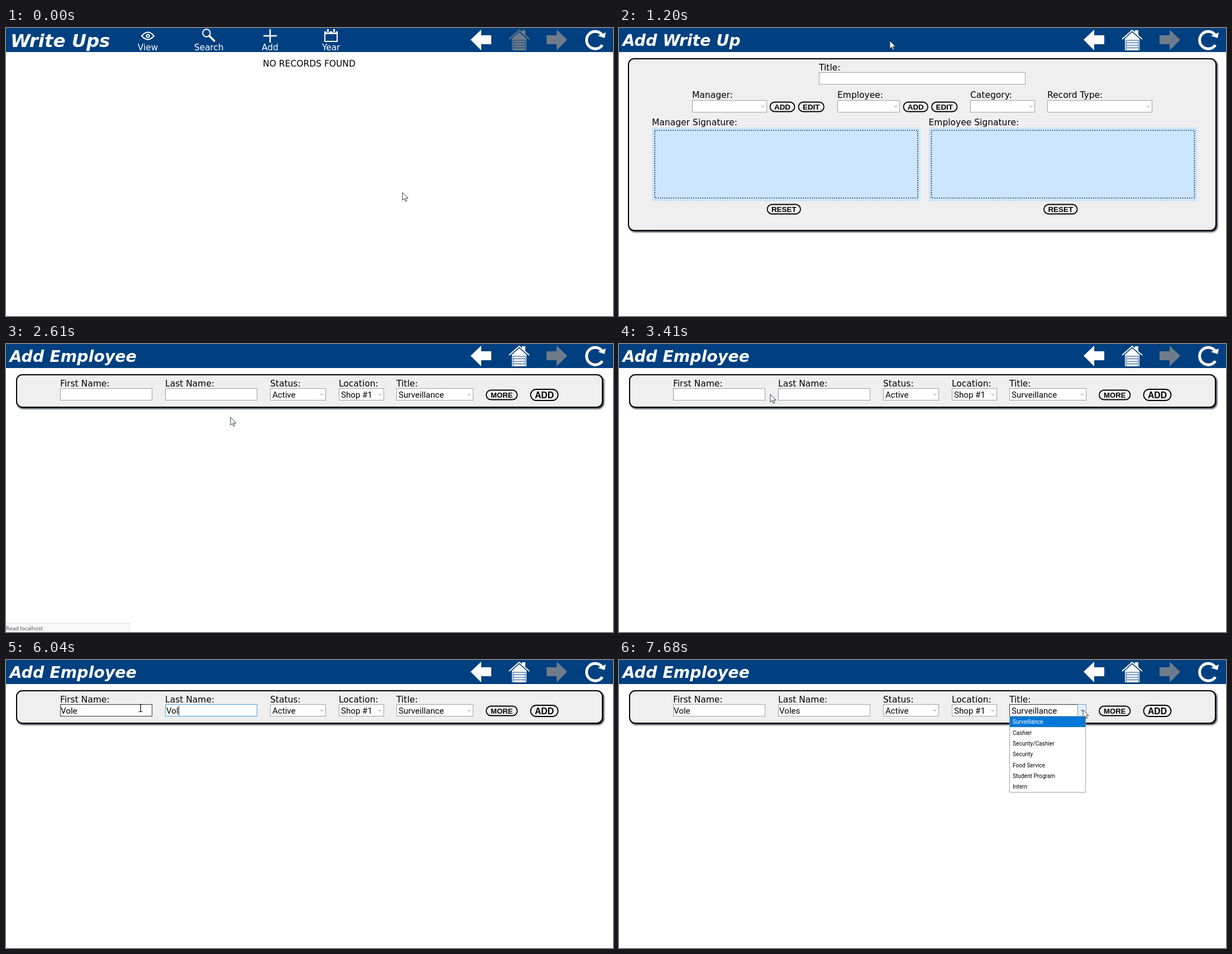
Recreate the animation shown at these times as an HTML page. Size 1087 px wide and 515 px high, loop 8 s.

```html
<!DOCTYPE html>
<html lang="en">
<head>
<meta charset="utf-8">
<title>Write Ups</title>
<style>
  html, body { margin: 0; width: 100%; height: 100%; overflow: hidden; background: #fff; }
  svg { display: block; width: 1087px; height: 515px; }
  text { white-space: pre; }
  .label { font: 15.5px "DejaVu Sans", sans-serif; }
  .tool { font: 15.3px "DejaVu Sans", sans-serif; fill: #fff; text-anchor: middle; }
  .heading { font: italic bold 28.4px "DejaVu Sans", sans-serif; fill: #fff; }
  .value { font: 15.1px Roboto, "Open Sans", sans-serif; }
  .option { font: 10.15px Roboto, "Open Sans", sans-serif; }
  .status { font: 9.7px "Open Sans", "Noto Sans", sans-serif; fill: #444; }
  .button { font-family: "Liberation Sans", Arial, sans-serif; font-weight: bold; text-anchor: middle; }
  .panel { fill: #efefef; stroke: #000; stroke-width: 2; filter: drop-shadow(2.5px 2.5px 1.8px #1c2733); }
  .field { fill: #fff; stroke: #a0a0a0; }
  .line { fill: none; stroke: #fff; }
</style>
</head>
<body>
<svg id="stage" viewBox="0 0 1087 515"></svg>
<script>
const LOOP = 8000, BLUE = '#004080', GREY = '#6e7c8a';
const FIRST = 'Vole', LAST = 'Voles';

const label = (x, y, s) => `<text class="label" x="${x}" y="${y}">${s}</text>`;
const heading = (x, y, s, size = 28.4) =>
  `<text class="heading" x="${x}" y="${y}" style="font-size:${size}px">${s}</text>`;
const panel = (x, y, w, h) => `<rect class="panel" x="${x}" y="${y}" width="${w}" height="${h}" rx="10"/>`;

function field(x, y, right, id = '') {
  return `<rect class="field" id="${id}" x="${x + .5}" y="${y + .5}" width="${right - x - 1}" height="21"/>`;
}
function select(x, y, right, value = '') {
  return field(x, y, right) +
    `<path d="M${right - 10} ${y + 10}l2.5 2.5l2.5 -2.5" fill="none" stroke="#777"/>` +
    `<text class="value" x="${x + 4}" y="${y + 17}">${value}</text>`;
}
function button(x, y, right, s, { h = 19, size = 13.4, id = '' } = {}) {
  return `<g id="${id}" stroke="#000" fill="#000">
    <rect x="${x + 1}" y="${y + 1}" width="${right - x - 2}" height="${h - 2}" rx="${h / 2 - 1}" fill="#f2f2f2" stroke-width="1.8"/>
    <text class="button" x="${(x + right) / 2}" y="${y + h / 2 + size * .36}" font-size="${size}" stroke="none">${s}</text></g>`;
}
function signature(x, who) {
  return label(x, 174, who + ' Signature:') +
    `<rect x="${x}" y="178" width="481" height="132" fill="#cce6ff"/>
     <rect x="${x + 5}" y="183" width="471" height="121" fill="none" stroke="#1a222a" stroke-width="1.7" stroke-dasharray="1.7 2.3"/>` +
    button(x + 205.5, 314.5, x + 267, 'RESET');
}

const arrowLeft = 'M832 21L851 3V13H869V29H851V40Z';
const navigation = `
  <path d="${arrowLeft}" fill="#fff"/>
  <path d="${arrowLeft}" fill="${GREY}" transform="matrix(-1 0 0 1 1837 0)"/>
  <g id="home">
    <path d="M924 4H930V14L924 9ZM906 19L919 7L932 19V40H906Z"/>
    <path d="M901 20L919 4L937 20" fill="none" stroke="currentColor" stroke-width="2"/>
    <path d="M904 20L919 7L934 20M908 40V22H930V40M909 26.5H929M909 31H929M909 35.5H929" fill="none" stroke="${BLUE}"/>
  </g>
  <path class="line" d="M1066.9 11.5A15.5 15.5 0 1 0 1068 30.4" stroke-width="5"/>
  <path d="M1074 8L1072 18L1060 14Z" fill="#fff"/>`;

const listPage = `
  ${heading(8, 34, 'Write Ups', 32.4)}
  <g class="line" stroke-width="2">
    <path d="M243 14Q254 1 265 14Q254 27 243 14Z"/><circle cx="254" cy="14" r="2.6"/>
    <circle cx="359" cy="9" r="6.7"/><path d="M364 14L374 24" stroke-width="3.6"/>
    <path d="M461 14H485M473 2V26" stroke-width="2.5"/>
    <path d="M571 7H593V24H571Z"/><path d="M570 8.5H594" stroke-width="5"/>
    <path d="M576.5 1V8M587.5 1V8" stroke="${BLUE}" stroke-width="6"/>
    <path d="M576.5 2V7M587.5 2V7" stroke-width="3"/>
  </g>
  ${['View', 'Search', 'Add', 'Year'].map((s, i) =>
    `<text class="tool" x="${254 + 109.4 * i}" y="40">${s}</text>`).join('')}
  <text class="label" x="543" y="69" text-anchor="middle">NO RECORDS FOUND</text>`;

const writeUpPage = heading(6.5, 32, 'Add Write Up') + panel(17, 55, 1052, 307) +
  label(358, 76, 'Title:') + field(358, 79, 728) +
  label(131, 125, 'Manager:') + select(131, 129, 265) +
  button(269.5, 131.5, 315.5, 'ADD') + button(320.5, 131.5, 368, 'EDIT') +
  label(391, 125, 'Employee:') + select(391, 129, 503) +
  button(508.5, 131.5, 554, 'ADD', { id: 'addEmployee' }) + button(559, 131.5, 606.5, 'EDIT') +
  label(629, 125, 'Category:') + select(629, 129, 745) +
  label(767, 125, 'Record Type:') + select(767, 129, 955) +
  signature(59, 'Manager') + signature(554.5, 'Employee');

const jobs = ['Surveillance', 'Cashier', 'Security/Cashier', 'Security', 'Food Service', 'Student Program', 'Intern'];
const dropdown = `
  <rect x="699.5" y="79.5" width="137" height="21" fill="none" stroke="#333"/>
  <rect x="821.5" y="79.5" width="15" height="21" fill="#e5f1fb" stroke="#5fa8dc"/>
  <path d="M827 89l2.5 2.5l2.5 -2.5" fill="none" stroke="#333"/>
  <rect x="699.5" y="100.5" width="136" height="136" fill="#fff" stroke="#a0a0a0"/>
  <rect x="700" y="101" width="135" height="19" fill="#0078d7"/>
  ${jobs.map((s, i) => `<text class="option" x="705" y="${114.3 + 19.3 * i}" fill="${i ? '#000' : '#fff'}">${s}</text>`).join('')}`;

const employeePage = heading(6.5, 32, 'Add Employee') + panel(19, 55, 1049, 58) +
  label(97, 76, 'First Name:') + field(97, 79, 262, 'firstBox') +
  label(285, 76, 'Last Name:') + field(285, 79, 450, 'lastBox') +
  label(473, 76, 'Status:') + select(473, 79, 573, 'Active') +
  label(596, 76, 'Location:') + select(596, 79, 677, 'Shop #1') +
  label(699, 76, 'Title:') + select(699, 79, 837, 'Surveillance') +
  button(859, 81.5, 916.5, 'MORE', { size: 13.1 }) + button(938.5, 80, 989.5, 'ADD', { h: 22, size: 15.8 }) +
  `<text class="value" id="first" x="98" y="96"></text><text class="value" id="last" x="287" y="96"></text>
   <path id="caret" d="M.5 82V99" stroke="#000"/><g id="dropdown">${dropdown}</g>`;

document.getElementById('stage').innerHTML = `
  <rect width="1087" height="43" fill="${BLUE}"/>${navigation}
  <g id="list">${listPage}</g><g id="writeUp">${writeUpPage}</g><g id="employee">${employeePage}</g>
  <g id="status"><rect x="-.5" y="499.5" width="221.5" height="17" fill="#f8f8f8" stroke="#dedede"/>
    <text class="status" x="0" y="512">Read localhost</text></g>
  <g id="cursor" fill="#fff" stroke="#26364a" stroke-linejoin="round">
    <path id="arrow" d="M0 0V14L3.3 11L5.5 16L7.7 15L5.5 10.3H10Z"/>
    <path id="hand" d="M-1.5 1Q0 -1 1.5 1V6Q3.5 5 4.5 6.8Q6.5 6 7 8Q8.5 7.5 8.5 9.5V13L7 17H0L-4 10.5Q-4.5 8 -1.5 10Z"/>
    <path id="beam" d="M-3.5 -6.5H3.5M-3.5 6.5H3.5M0 -6.5V6.5" stroke="#000" stroke-width="1.2"/>
  </g>`;

const el = Object.fromEntries([...document.querySelectorAll('[id]')].filter(e => e.id).map(e => [e.id, e]));
const show = (e, on) => e.setAttribute('display', on ? 'inline' : 'none');

// time, x, y, pointer
const pointer = [
  [0, 710, 294, 'arrow'], [200, 692, 270, 'arrow'], [400, 610, 165, 'arrow'], [600, 512, 54, 'arrow'],
  [800, 482, 24, 'hand'], [1000, 485, 23, 'arrow'], [1590, 487, 36, 'arrow'], [1800, 494, 68, 'arrow'],
  [2000, 508, 108, 'arrow'], [2200, 520, 136, 'hand'], [2400, 521, 139, 'hand'], [2610, 402, 131, 'arrow'],
  [2830, 372, 120, 'arrow'], [3030, 318, 104, 'arrow'], [3220, 271, 90, 'arrow'], [3420, 250, 86, 'beam'],
  [3620, 243, 86, 'beam'], [3810, 241, 86, 'beam'], [6870, 330, 88, 'beam'], [7080, 560, 88, 'arrow'],
  [7280, 770, 88, 'arrow'], [7480, 828, 89, 'arrow'], [7680, 831, 89, 'arrow']
];
const firstKeys = [[0, 0], [4420, 1], [4620, 3], [4820, 4]];
const lastKeys = [[0, 0], [5640, 1], [5840, 2], [6040, 3], [6250, 4], [6450, 5]];
const at = (keys, t) => keys.findLast(k => k[0] <= t);
const during = (t, from, to) => t >= from && t < to;

function draw(t) {
  show(el.list, t < 1000);
  show(el.writeUp, during(t, 1000, 2610));
  show(el.employee, t >= 2610);
  show(el.status, during(t, 1000, 1200) || during(t, 2610, 2830));

  const homeColor = t < 1000 ? GREY : '#fff';
  el.home.setAttribute('fill', homeColor);
  el.home.setAttribute('color', homeColor);

  const hover = during(t, 2200, 2610) ? '#0b4a9c' : '#000';
  el.addEmployee.setAttribute('stroke', hover);
  el.addEmployee.setAttribute('fill', hover);

  el.first.textContent = FIRST.slice(0, at(firstKeys, t)[1]);
  el.last.textContent = LAST.slice(0, at(lastKeys, t)[1]);
  el.firstBox.style.stroke = during(t, 3420, 6870) ? '#333' : '';
  el.lastBox.style.stroke = during(t, 5240, 7680) ? '#4a9be0' : '';
  show(el.dropdown, t >= 7680);

  const active = t < 5240 ? el.first : el.last;
  show(el.caret, during(t, 3810, 6650) || during(t, 7080, 7680));
  if (t >= 3810) {
    const x = +active.getAttribute('x') + Math.round(active.getComputedTextLength());
    el.caret.setAttribute('transform', `translate(${x} 0)`);
  }

  const [, x, y, shape] = at(pointer, t);
  for (const name of ['arrow', 'hand', 'beam']) show(el[name], name === shape);
  el.cursor.setAttribute('transform', `translate(${x} ${y})`);
}

function tick() {
  draw(performance.now() % LOOP);
  requestAnimationFrame(tick);
}
tick();
</script>
</body>
</html>
```
